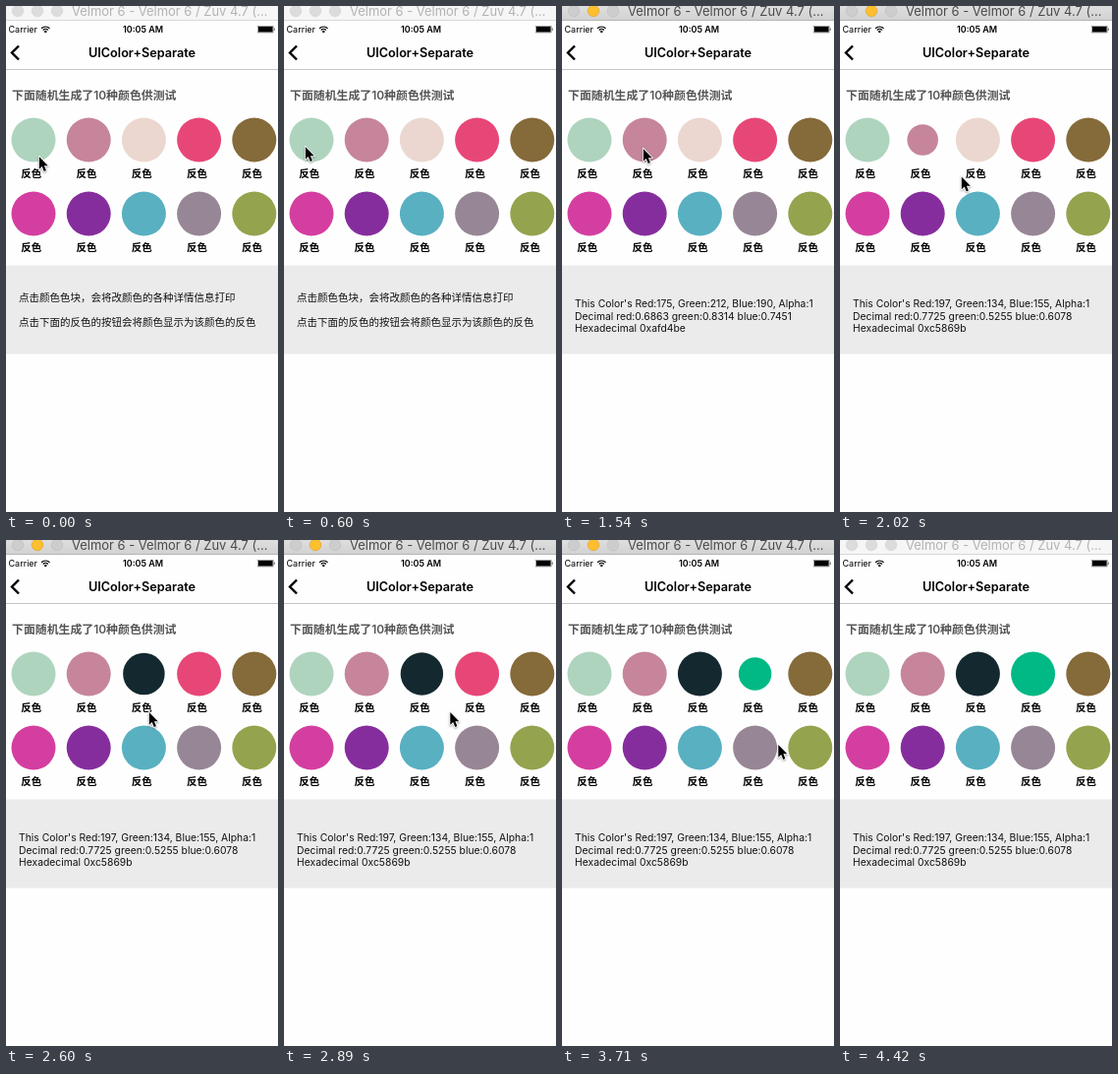
These frames come from a looping animation (277 by 514 pixels, 4470 ms). An HTML page with a canvas:

```html
<!DOCTYPE html>
<html lang="zh-CN">
<head>
<meta charset="utf-8">
<title>UIColor+Separate</title>
<style>
html, body { margin: 0; width: 100%; height: 100%; overflow: hidden; background: #fefefe; }
canvas { display: block; width: 277px; height: 514px; }
</style>
</head>
<body>
<canvas id="stage"></canvas>
<script>
const W = 277, H = 514, LOOP = 4470, FIRST = 119, STEP = 58.8;
const FONT = 'Inter, "Noto Sans CJK SC", "Noto Sans CJK JP", "Noto Sans CJK", sans-serif';
const canvas = document.getElementById('stage');
const ctx = canvas.getContext('2d');
const dpr = window.devicePixelRatio || 1;
canvas.width = W * dpr;
canvas.height = H * dpr;

const COLORS = ['#aed4be', '#c6859a', '#ebd7cf', '#e74777', '#856a3a',
                '#d43ea0', '#862d9d', '#58b0c1', '#978695', '#94a34d'];
const INVERTED = { 2: '#14282f', 3: '#00b985' };
const HALF_PULSE = 3.3;
// tick at which each tapped circle is smallest
const PULSES = [19, 33, 45.4, 61.2];

// tick, x, y of the pointer tip
const PATH = [
  [0, 33, 152], [4, 29, 172], [9, 21, 142], [11, 27.5, 136.5], [19, 27.5, 136.5],
  [23, 78, 144], [25, 82, 144], [30, 82, 144], [33, 123, 172.5], [37, 145, 174],
  [45, 145, 174], [48, 168.5, 174], [51, 185, 173], [54, 197, 167], [59, 197, 167],
  [62, 219.5, 207], [65, 268, 409]
];
const POINTER_GONE = 66, ACTIVE_FROM = 14, ACTIVE_TO = 74;

const HINTS = ['点击颜色色块，会将改颜色的各种详情信息打印', '点击下面的反色的按钮会将颜色显示为该颜色的反色'];
const DETAILS = [
  { from: 30, lines: ["This Color's Red:197, Green:134, Blue:155, Alpha:1",
    'Decimal red:0.7725 green:0.5255 blue:0.6078', 'Hexadecimal 0xc5869b'] },
  { from: 15, lines: ["This Color's Red:175, Green:212, Blue:190, Alpha:1",
    'Decimal red:0.6863 green:0.8314 blue:0.7451', 'Hexadecimal 0xafd4be'] }
];

const smooth = u => u * u * (3 - 2 * u);

function rect(x, y, w, h, color) {
  ctx.fillStyle = color;
  ctx.fillRect(x, y, w, h);
}

function disc(x, y, r, color, edge) {
  ctx.beginPath();
  ctx.arc(x, y, r, 0, Math.PI * 2);
  ctx.fillStyle = color;
  ctx.fill();
  if (edge) {
    ctx.strokeStyle = edge;
    ctx.lineWidth = 0.6;
    ctx.stroke();
  }
}

function text(str, x, y, size, color = '#000', weight = 400, align = 'left') {
  ctx.font = `${weight} ${size}px ${FONT}`;
  ctx.textAlign = align;
  ctx.fillStyle = color;
  ctx.fillText(str, x, y);
}

function titleBar(active) {
  if (active) {
    const shade = ctx.createLinearGradient(0, 0, 0, 15);
    shade.addColorStop(0, '#dedede');
    shade.addColorStop(1, '#d1d1d1');
    rect(0, 0, W, 15, shade);
  } else {
    rect(0, 0, W, 15, '#f6f6f6');
  }
  rect(0, 14, W, 1, active ? '#b5b5b5' : '#d8d8d8');
  [12, 32, 52].forEach((x, i) => {
    if (active && i === 1) disc(x, 5, 5.8, '#fdbe30', '#dfa023');
    else disc(x, 5, 5.8, active ? '#cdcdcd' : '#dcdcdc', active ? '#bdbdbd' : '#d2d2d2');
  });
  text('Velmor 6 - Velmor 6 / Zuv 4.7 (…', 67, 10, 12.95, active ? '#4a4a4a' : '#b3b3b3');
}

function statusBar() {
  text('Carrier', 2.5, 27, 9);
  ctx.strokeStyle = '#000';
  ctx.lineWidth = 1.2;
  for (const r of [3.6, 6]) {
    ctx.beginPath();
    ctx.arc(40.3, 27, r, -Math.PI * 0.75, -Math.PI * 0.25);
    ctx.stroke();
  }
  disc(40.3, 26, 1.2, '#000');
  text('10:05 AM', 139.5, 27, 9, '#000', 600, 'center');
  ctx.strokeStyle = '#777';
  ctx.lineWidth = 0.6;
  ctx.strokeRect(256.5, 20.4, 15.6, 6.6);
  rect(257, 20.9, 14.6, 5.6, '#000');
  rect(272.8, 22.4, 0.8, 2.6, '#444');
}

function navBar() {
  ctx.beginPath();
  ctx.moveTo(13, 40.5);
  ctx.lineTo(6, 47.5);
  ctx.lineTo(13, 54.5);
  ctx.strokeStyle = '#000';
  ctx.lineWidth = 2.4;
  ctx.stroke();
  text('UIColor+Separate', 138.5, 52, 12.7, '#000', 600, 'center');
  rect(0, 64, W, 1, '#c4c4c4');
}

function circleScale(i, n) {
  if (i >= PULSES.length) return 1;
  const d = Math.min(1, Math.abs(n - PULSES[i]) / HALF_PULSE);
  return 0.7 + 0.3 * smooth(d);
}

function palette(n) {
  COLORS.forEach((color, i) => {
    const x = 28 + (i % 5) * 56.2, y = i < 5 ? 136 : 211;
    const flipped = INVERTED[i] && n > PULSES[i] - HALF_PULSE;
    disc(x, y, 22.5 * circleScale(i, n), flipped ? INVERTED[i] : color);
    text('反色', x - 2.2, y + 37.8, 10.5, '#000', 600, 'center');
  });
}

function panel(n) {
  rect(0, 263.5, W, 90, '#ebebeb');
  const detail = DETAILS.find(d => n >= d.from);
  if (detail) detail.lines.forEach((s, i) => text(s, 13, 306 + i * 12.5, 10.35, '#111'));
  else HINTS.forEach((s, i) => text(s, 13, 300 + i * 25, 10.5, '#111'));
}

function pointer(n) {
  if (n >= POINTER_GONE) return;
  const k = PATH.findIndex(p => p[0] >= n);
  const b = PATH[k], a = PATH[Math.max(0, k - 1)];
  const u = b === a ? 0 : (n - a[0]) / (b[0] - a[0]);
  ctx.save();
  ctx.translate(a[1] + (b[1] - a[1]) * u + 0.8, a[2] + (b[2] - a[2]) * u + 1);
  ctx.beginPath();
  ctx.moveTo(0, 0);
  [[0, 12.8], [2.9, 10.1], [5, 14.9], [7.1, 14], [5.1, 9.3], [9, 9.3]]
    .forEach(p => ctx.lineTo(...p));
  ctx.closePath();
  ctx.shadowColor = 'rgba(0,0,0,.35)';
  ctx.shadowBlur = 2 * dpr;
  ctx.shadowOffsetY = dpr;
  ctx.strokeStyle = '#fff';
  ctx.lineWidth = 1.8;
  ctx.lineJoin = 'round';
  ctx.stroke();
  ctx.shadowColor = 'transparent';
  ctx.fillStyle = '#000';
  ctx.fill();
  ctx.restore();
}

function draw(now) {
  const t = now % LOOP;
  const n = Math.max(0, Math.floor((t - FIRST) / STEP) + 1);
  ctx.setTransform(dpr, 0, 0, dpr, 0, 0);
  rect(0, 0, W, H, '#fefefe');
  titleBar(n >= ACTIVE_FROM && n < ACTIVE_TO);
  statusBar();
  navBar();
  text('下面随机生成了10种颜色供测试', 6, 95, 11.9, '#555', 600);
  palette(n);
  panel(n);
  pointer(n);
}

const start = performance.now();
function loop() {
  draw(performance.now() - start);
  requestAnimationFrame(loop);
}
loop();
</script>
</body>
</html>
```
